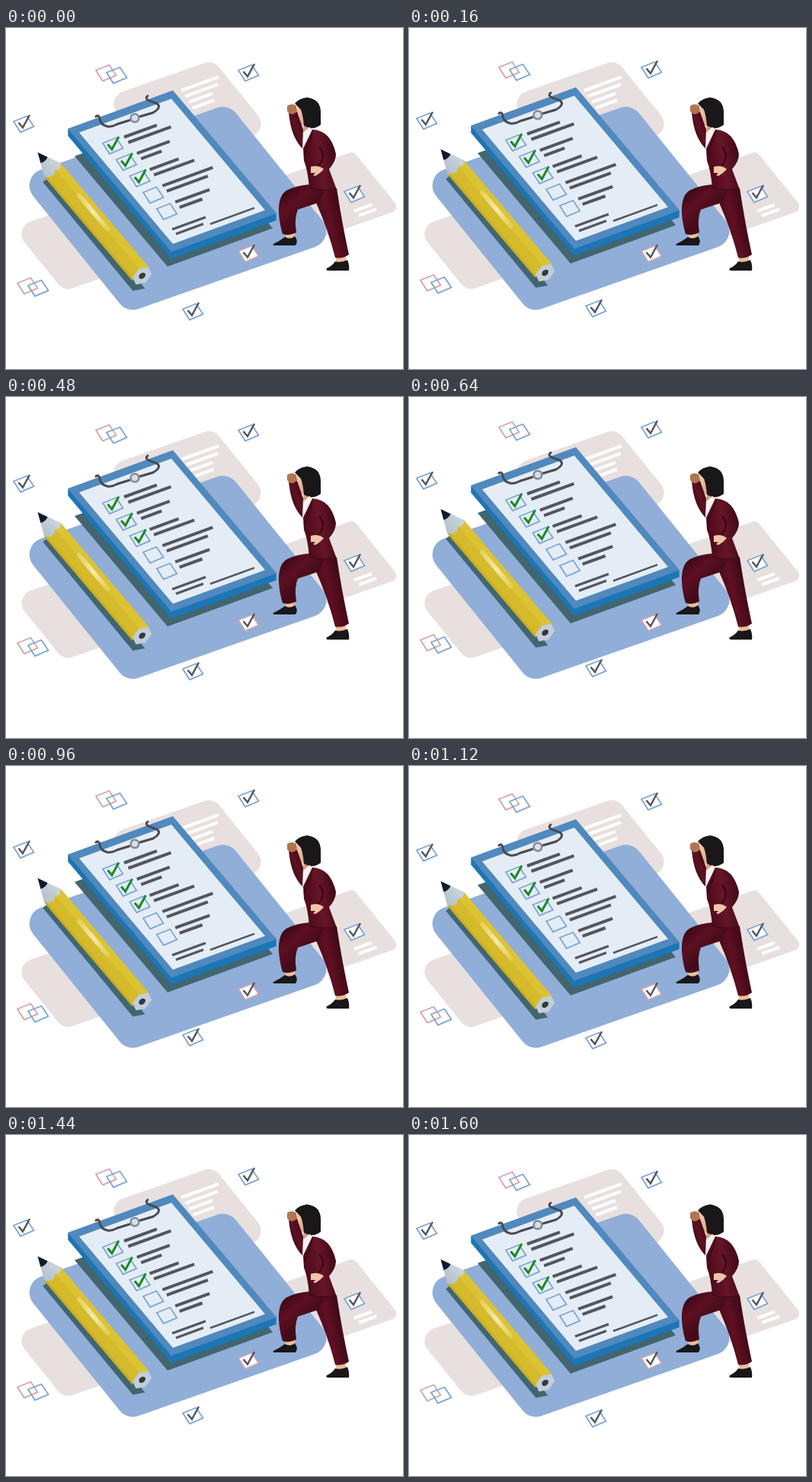
Animation, 521 px wide and 447 px high, one loop 1760 ms. Source, as an HTML page with a canvas:

```html
<!DOCTYPE html>
<html lang="en">
<head>
<meta charset="utf-8">
<title>Checklist</title>
<style>
html, body { margin: 0; width: 100%; height: 100%; overflow: hidden; background: #fff; }
canvas { display: block; width: 521px; height: 447px; }
</style>
</head>
<body>
<canvas id="stage" width="521" height="447"></canvas>
<script>
const ctx = document.getElementById('stage').getContext('2d');
const STEP = 160, STEPS = 11, RISE = 4;
const BLUE = '#7ca4d6', PINK = '#d3a3ac', INK = '#54555f', CARD = '#e8e0df',
      SHADE = '#42666f', SKIN = '#efbd9c', BLACK = '#191719', FOLD = '#36070f';
// Slopes of the two receding directions
const FLOOR = [-.35, 1.24], BOARD = [-.365, 1.187];

function fill(path, color) {
  ctx.fillStyle = color;
  ctx.fill(typeof path === 'string' ? new Path2D(path) : path);
}

function stroke(path, color, width, cap = 'butt') {
  ctx.strokeStyle = color;
  ctx.lineWidth = width;
  ctx.lineCap = cap;
  ctx.stroke(typeof path === 'string' ? new Path2D(path) : path);
}

function gradient(x1, y1, x2, y2, ...colors) {
  const g = ctx.createLinearGradient(x1, y1, x2, y2);
  colors.forEach((c, i) => g.addColorStop(i / (colors.length - 1), c));
  return g;
}

function at(x, y, draw) {
  ctx.save();
  ctx.translate(x, y);
  draw();
  ctx.restore();
}

// Parallelogram from its left corner, with the given spans in x
function quad(x, y, w, h, [su, sv], color, r = 0) {
  const pts = [[0, 0], [w, 0], [w, h], [0, h]].map(([a, b]) => [x + a + b, y + a * su + b * sv]);
  const path = new Path2D();
  path.moveTo(x + h / 2, y + h * sv / 2);
  pts.forEach((p, i) => path.arcTo(...p, ...pts[(i + 1) % 4], r));
  path.closePath();
  fill(path, color);
}

function rule(x, y, length, color, width) {
  stroke(`M${x} ${y}l${length} ${length * BOARD[0]}`, color, width);
}

const BOX = 'M-13-3.5 4.5-10.5 13.5 3-4 10.5Z';
const TICK = 'M-6.5-2-1 4.5 8-12';

function box(x, y, color, inside) {
  at(x, y, () => {
    if (inside) fill(BOX, inside);
    stroke(BOX, color, 1.8);
  });
}

function tick(x, y, color, width) {
  at(x, y, () => stroke(TICK, color, width));
}

function checkIcon(x, y, color = BLUE) {
  box(x, y, color, '#fff');
  tick(x, y, INK, 2.5);
}

function pairIcon(x, y) {
  box(x - 7, y - 1, PINK);
  box(x + 7, y + 2, BLUE);
}

function backdrop() {
  quad(130, 91.5, 142, 74, FLOOR, CARD, 17);
  quad(9, 262, 140, 67, FLOOR, CARD, 17);
  quad(352, 198, 104, 61.5, FLOOR, CARD, 8);
  [49, 43, 31, 28].forEach((length, i) => rule(230 + i * 5, 82 + i * 7.6, length, '#fff', 4));
  quad(16, 196, 276, 143, FLOOR, '#90aed7', 22);
  for (const i of [0, 1]) rule(457 + i * 6, 240 + i * 6, 23, '#fff', 4);
  checkIcon(457, 218);
  checkIcon(318, 296, PINK);
}

function clipboard() {
  quad(90, 168, 138, 122, BOARD, SHADE);
  for (let depth = 9; depth > 0; depth--) quad(81, 132 + depth, 138, 136, BOARD, '#1c76b6');
  quad(81, 132, 138, 136, BOARD, '#5089bd');
  quad(96, 137, 121, 123, BOARD, '#e4edf5');

  const lengths = [43, 56, 43, 27, 38, 53, 66, 54, 45, 30];
  lengths.forEach((length, i) => {
    const row = i >> 1, sub = i % 2;
    rule(155 + row * 16.8 + sub * 5.5, 143 + row * 21.3 + sub * 7, length, INK, 4);
  });
  rule(218, 264, 44, INK, 3.2);
  rule(223, 270, 36, INK, 3.2);
  rule(268, 257, 58, INK, 2.5);

  for (let i = 0; i < 5; i++) {
    const x = 140 + i * 17.7, y = 154.5 + i * 21.5;
    box(x, y, BLUE);
    if (i < 3) tick(x, y, '#1c8a26', 3);
  }
  clip();
}

function clip() {
  stroke('M118 116Q122 113 123 119Q124 127 133 129Q139 130 146 126L162 121' +
         'M176 116 193 111Q205 104 198 99L187 95Q182 92 186 89', '#494a52', 3, 'round');
  const ring = new Path2D();
  ring.arc(169, 118, 5.3, 0, Math.PI * 2);
  fill(ring, '#d8dfe9');
  stroke(ring, '#858993', 2.6);
}

// Drawn along its own axis, from the tip on the left to the flat end
function pencil() {
  ctx.save();
  ctx.translate(61, 186);
  ctx.rotate(Math.atan2(138, 117));
  fill('M4 0V20L189 22 197 8Z', SHADE);
  fill('M0-14H178V14H0Z', '#d5bb2b');
  fill('M0-14H178V-3H0Z', '#dcc334');
  fill('M0 11H178V14H0Z', '#c9ae22');
  stroke('M48-5H106', gradient(48, 0, 106, 0, '#e6d15c', '#f4e9ae', '#e3cd50'), 6, 'round');
  fill('M-30 0 0-14Q8-9 2-3Q9 4 3 11L0 14Z', gradient(0, -14, 0, 14, '#ccd6de', '#b2c0ca'));
  fill('M-30 0-17-6Q-14 0-17 6Z', '#101a2c');

  const end = new Path2D();
  for (let deg = 10; deg < 370; deg += 60) {
    const a = deg * Math.PI / 180;
    end.lineTo(182 + 10 * Math.cos(a), 14.5 * Math.sin(a));
  }
  fill(end, '#c2ced8');
  const core = new Path2D();
  core.ellipse(182, 0, 3.6, 4.8, 0, 0, Math.PI * 2);
  fill(core, '#343942');
  ctx.restore();
}

function legs() {
  fill('M432 296H446V309H434Z', SKIN);
  fill('M421 314Q428 311 432 305Q440 307 448 303Q451 310 450 317H423Q419 317 421 314Z', BLACK);
  fill('M400 207 434 209Q441 255 450 296Q441 302 432 300Q423 264 407 228Z',
       gradient(405, 250, 442, 242, '#42091a', '#5e1022', '#3d0815'));
  fill('M367 266H379V277H367Z', SKIN);
  fill('M351 282Q358 279 366 273Q373 277 379 272Q384 278 380 284H353Q349 284 351 282Z', BLACK);
  fill('M399 204Q382 205 368 212C354 221 357 248 363 269Q372 272 381 267Q378 249 383 237L410 228 420 209Z',
       gradient(362, 215, 388, 245, '#3c0814', '#5c1022', '#450b19'));
}

function head() {
  fill('M383 101 378 117 381 119Q380 127 390 126V139L402 133V103Z',
       gradient(379, 112, 397, 117, '#f5ccb0', '#d89c7c'));
  fill('M379 98Q385 91 395 90Q412 92 413 108V126Q402 134 391 127Q390 114 387 106Z', BLACK);
}

function torso() {
  fill('M387 139 398 129 404 133 394 166 388 160Z', '#f4f2f3');
  fill('M371 110 382 109 390 132 389 157Q374 142 371 110Z',
       gradient(371, 130, 389, 123, '#3f0917', '#5e1123', '#420a18'));
  fill('M369 101Q375 97 381 101L382 108Q375 116 369 108Z', '#b07650');
  fill('M402 132Q426 133 433 164Q433 174 424 184L434 211Q415 214 398 209Q396 185 391 173L390 157Z',
       gradient(392, 170, 433, 164, '#4c0b1b', '#661528', '#400916'));
  stroke('M411 155Q421 167 410 180', FOLD, 2);
  fill('M400 181Q410 178 417 184Q412 190 406 193L403 192 406 189 400 189Z', '#f0c5a8');
  stroke('M402 134 399 147 391 166M398 209Q416 213 434 210', FOLD, 1.2);
}

function woman() {
  legs();
  head();
  torso();
}

function floating() {
  clipboard();
  pencil();
  checkIcon(318, 59);
  checkIcon(23, 126);
  checkIcon(245, 372);
  pairIcon(138, 60);
  pairIcon(35, 339);
}

function frame(now) {
  const step = Math.floor(now / STEP) % STEPS;
  const lift = RISE * (5 - Math.abs(5 - step));
  ctx.fillStyle = '#fff';
  ctx.fillRect(0, 0, 521, 447);
  backdrop();
  at(0, -lift, floating);
  at(0, 1, woman);
}

let start;
function loop(now) {
  start ??= now;
  frame(now - start);
  requestAnimationFrame(loop);
}
frame(0);
requestAnimationFrame(loop);
</script>
</body>
</html>
```
